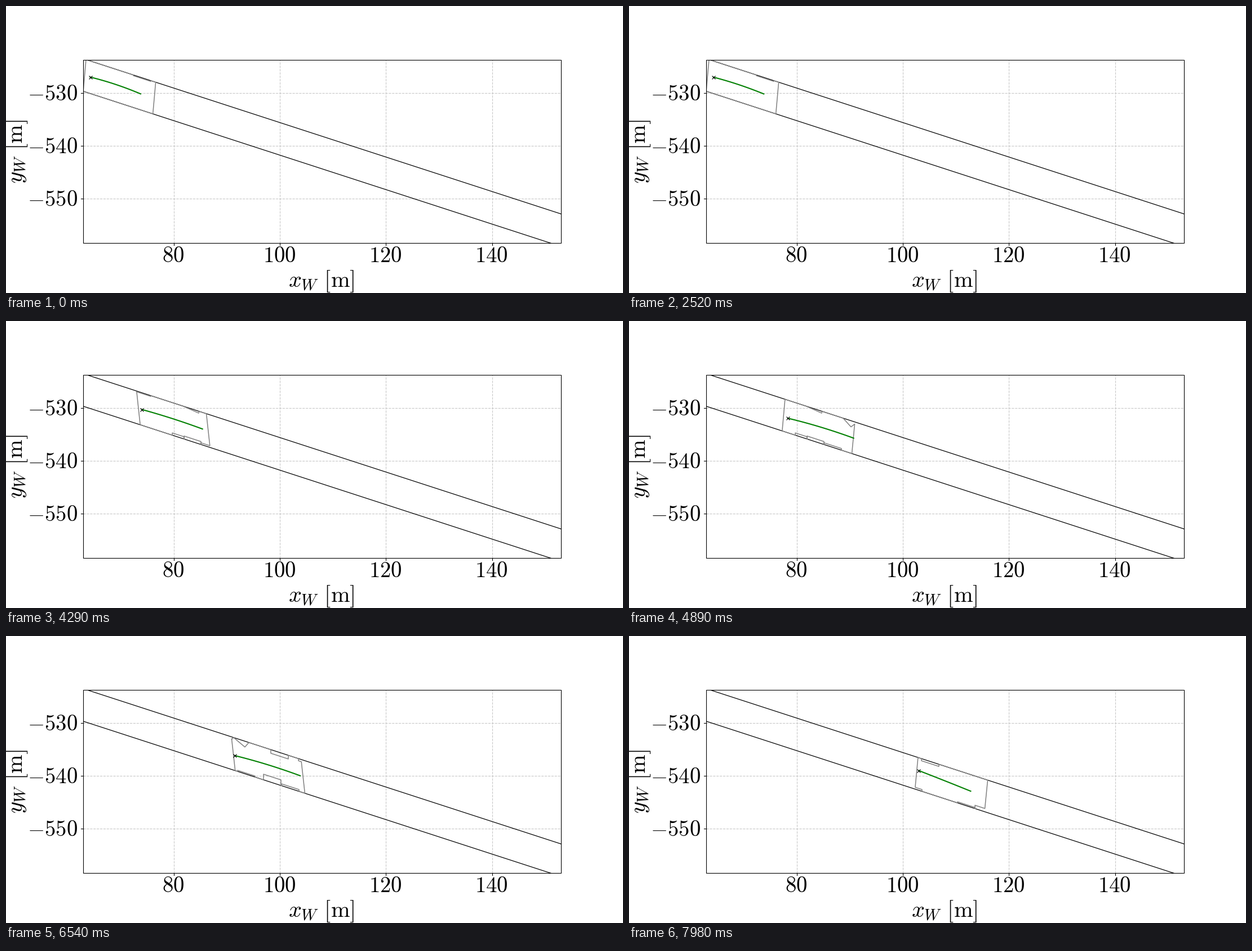
Recreate the animation shown at these times as a matplotlib script. Size 1095x511 px, loop 8 s.

```python
import matplotlib.pyplot as plt
import numpy as np
from matplotlib.animation import FuncAnimation
from matplotlib.patches import Rectangle

W, H, DPI = 1095, 511, 100
FRAMES, INTERVAL = 250, 32
STEP = 30  # ms between simulation steps

plt.rcParams["mathtext.fontset"] = "cm"

LEFT, RIGHT, TOP, BOTTOM = 137, 985, 96, 422
PX_PER_M = 9.41

# Parallel road borders: y = offset + SLOPE * x
SLOPE, UPPER, LOWER = 0.326, 49.1, 107.1
CENTRE = UPPER + 29.5

# Corridor nodes along the borders
FIRST_NODE, NODE, SPAN, SKEW = 142, 11.24, 11, 5

# Obstacles on the borders: boxes {start x: depth}, spikes (start, apex, end, depth)
BOX_LENGTH = 31
UPPER_BOXES = {226: 1.3, 470: 6.5, 519: 3.8}
LOWER_BOXES = {295: 4, 316: 5.3, 346: 3, 411: 1.9, 457: 10,
               489: 3.2, 583: 2, 614: 5.9}
UPPER_SPIKES = [(314, 342, 343, 3.4), (380, 394, 404, 11), (404, 424, 431, 10.4)]

# Vehicle motion: smooth start, then cruising with a slow speed ripple
REST_X, START, SPEED, RAMP = 149.5, 2.43, 75, 0.7
LANE_X = [150, 200, 281, 332, 406, 513]
LANE_SHIFT = [-0.7, -2, 2.7, 0, 2, -6.6]


def obstacle_points(boxes, spikes=()):
    """Border outline as (x, depth into the road)."""
    shapes = [[(a, 0), (b, d), (c, 0)] for a, b, c, d in spikes]
    starts = sorted(boxes)
    for a, after in zip(starts, starts[1:] + [W]):
        b, d = min(a + BOX_LENGTH, after), boxes[a]
        shapes.append([(a, 0), (a, d), (b, d), (b, 0)])
    shapes.sort()
    return np.array([(0, 0)] + sum(shapes, []) + [(W, 0)], float)


UPPER_POINTS = obstacle_points(UPPER_BOXES, UPPER_SPIKES)
LOWER_POINTS = obstacle_points(LOWER_BOXES)


def border(points, offset, inward, x0, x1):
    """Part of one border between x0 and x1, obstacles included."""
    xs, depth = points.T
    inside = (xs > x0) & (xs < x1)
    d0, d1 = np.interp([x0, x1], xs, depth)
    x = np.concatenate([[x0], xs[inside], [x1]])
    d = np.concatenate([[d0], depth[inside], [d1]])
    return np.column_stack([x, offset + SLOPE * x + inward * d])


def car_pose(t):
    s = max(0.0, t - START)
    ramp = 1 - np.exp(-s / RAMP)
    ripple = 2.5 * ramp * np.cos(1.717 * (t - 3.63))
    x = REST_X + SPEED * (s - RAMP * ramp) + ripple
    return x, CENTRE + SLOPE * x + np.interp(x, LANE_X, LANE_SHIFT)


def settle(t):
    """One at rest, fading to zero while driving off."""
    return np.exp(-max(0.0, t - START) / 0.5)


def corridor(t, x):
    # The two borders advance by one node in turn
    lag = 1.9 + 7 * settle(t)
    half = int(2 * (x - lag - FIRST_NODE + SKEW / 2) / NODE)
    up = FIRST_NODE + NODE * (half // 2)
    low = FIRST_NODE - SKEW + NODE * ((half + 1) // 2)
    upper = border(UPPER_POINTS, UPPER, 1, up, up + SPAN * NODE)
    lower = border(LOWER_POINTS, LOWER, -1, low, low + SPAN * NODE)
    return np.vstack([upper, lower[::-1], upper[:1]])


def planned_path(t, step, x, y):
    """Path back to the lane centre; long plans bow upwards."""
    wave = np.cos(2 * np.pi * (max(t, 3.63) - 4.72) / 2.03)
    length = 104 + 15 * wave
    bow = 1 + wave + 2 * settle(t)
    if t < START:  # replanning noise at standstill
        bow += np.random.default_rng(step).uniform(-0.3, 0.3)
    u = np.linspace(0, 1, 30)
    drop = CENTRE + SLOPE * (x + length) - y
    return x + length * u, y + drop * u - 4 * bow * u * (1 - u)


fig = plt.figure(figsize=(W / DPI, H / DPI), dpi=DPI, facecolor="white")
ax = fig.add_axes([0, 0, 1, 1])
ax.set_xlim(0, W)
ax.set_ylim(H, 0)
ax.axis("off")


def label(x, y, text, size=28, **kw):
    ax.text(x, y, text, fontsize=size, va="baseline", **kw)


grid = dict(color="#c8c8c8", lw=0.8, ls="--", zorder=1)
tick = dict(color="black", lw=0.8, zorder=2)
for value in range(80, 141, 20):
    x = 298 + (value - 80) * PX_PER_M
    ax.plot([x, x], [BOTTOM, TOP], **grid)
    ax.plot([x, x], [BOTTOM, BOTTOM + 4], **tick)
    label(x - 1.3, 456.5, f"${value}$", ha="center")
for value in range(-530, -551, -10):
    y = 154.8 - (value + 530) * PX_PER_M
    ax.plot([LEFT, RIGHT], [y, y], **grid)
    ax.plot([LEFT - 4, LEFT], [y, y], **tick)
    label(126.7, y + 13.2, f"${value}$", ha="right")
label(560, 500, r"$x_W\ [\mathrm{m}]$", 29, ha="center")
label(29, 259.5, r"$y_W\ [\mathrm{m}]$", 29, ha="center",
      rotation=90, rotation_mode="anchor")

frame_box = Rectangle((LEFT, TOP), RIGHT - LEFT, BOTTOM - TOP,
                      fill=False, ec="black", lw=0.8, zorder=6)
ax.add_patch(frame_box)
for offset in (UPPER, LOWER):
    ends = np.array([LEFT, RIGHT])
    road, = ax.plot(ends, offset + SLOPE * ends, color="black", lw=0.9, zorder=3)
    road.set_clip_path(frame_box)

outline, = ax.plot([], [], color="gray", lw=1.1, zorder=4)
path, = ax.plot([], [], color="green", lw=1.5, zorder=5)
car, = ax.plot([], [], "x", color="black", ms=4, mew=0.8, zorder=5.5)
outline.set_clip_path(frame_box)


def draw(i):
    step = round((i + 0.5) * INTERVAL / STEP)
    t = step * STEP / 1000
    x, y = car_pose(t)
    outline.set_data(*corridor(t, x).T)
    path.set_data(*planned_path(t, step, x, y))
    car.set_data([x], [y])
    return outline, path, car


anim = FuncAnimation(fig, draw, frames=FRAMES, interval=INTERVAL,
                     repeat=True, repeat_delay=0, blit=False)
plt.show()
```
